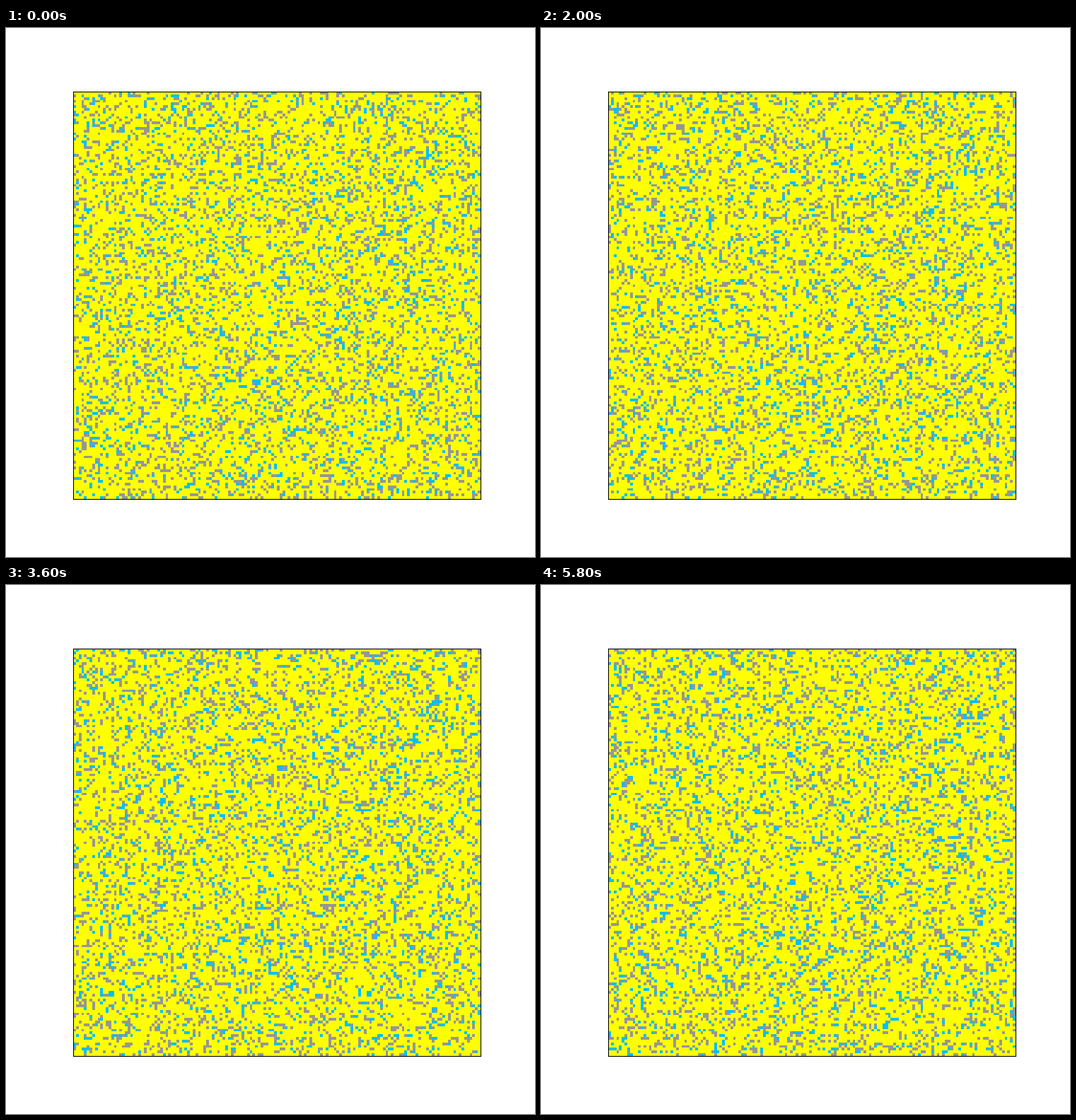
Animation of 748x748 px, one loop 6 s. Source, as a matplotlib script:

```python
import random

import matplotlib.pyplot as plt
import numpy as np
from matplotlib.animation import FuncAnimation
from matplotlib.colors import ListedColormap

SIZE = 150
FRAMES = 30
STICK = 0.6  # chance factor to break one blue bond
EMPTY, GREY, BLUE = 0, 1, 2

rng = random.Random(7)


def neighbours(k):
    r, c = divmod(k, SIZE)
    return (
        r * SIZE + (c + 1) % SIZE,
        r * SIZE + (c - 1) % SIZE,
        (r + 1) % SIZE * SIZE + c,
        (r - 1) % SIZE * SIZE + c,
    )


NEAR = [neighbours(k) for k in range(SIZE * SIZE)]


def bonds(cells, k):
    return sum(cells[n] == BLUE for n in NEAR[k])


def sweep(cells):
    """Let every particle try one hop to a free neighbour cell."""
    cells = cells.copy()
    particles = [k for k, kind in enumerate(cells) if kind]
    rng.shuffle(particles)
    for k in particles:
        goal = rng.choice(NEAR[k])
        if cells[goal]:
            continue
        kind = cells[k]
        if kind == BLUE:
            lost = bonds(cells, k) - (bonds(cells, goal) - 1)
            if lost > 0 and rng.random() > STICK ** lost:
                continue
        cells[k], cells[goal] = EMPTY, kind
    return cells


def simulate(steps):
    cells = rng.choices((EMPTY, GREY, BLUE), (0.755, 0.17, 0.075), k=SIZE * SIZE)
    states = [cells]
    for _ in range(steps - 1):
        states.append(sweep(states[-1]))
    return [np.array(s).reshape(SIZE, SIZE) for s in states]


states = simulate(FRAMES - 1)

fig, ax = plt.subplots(figsize=(7.48, 7.48), dpi=100)
ax.set(xticks=[], yticks=[])
colours = ListedColormap(["#ffff00", "#969696", "#00bfff"])
image = ax.imshow(states[0], cmap=colours, vmin=0, vmax=2, interpolation="nearest")


def update(i):
    image.set_data(states[max(0, i - 1)])  # the start state is held twice
    return (image,)


anim = FuncAnimation(fig, update, frames=FRAMES, interval=200, repeat=True, repeat_delay=0)
plt.show()
```
